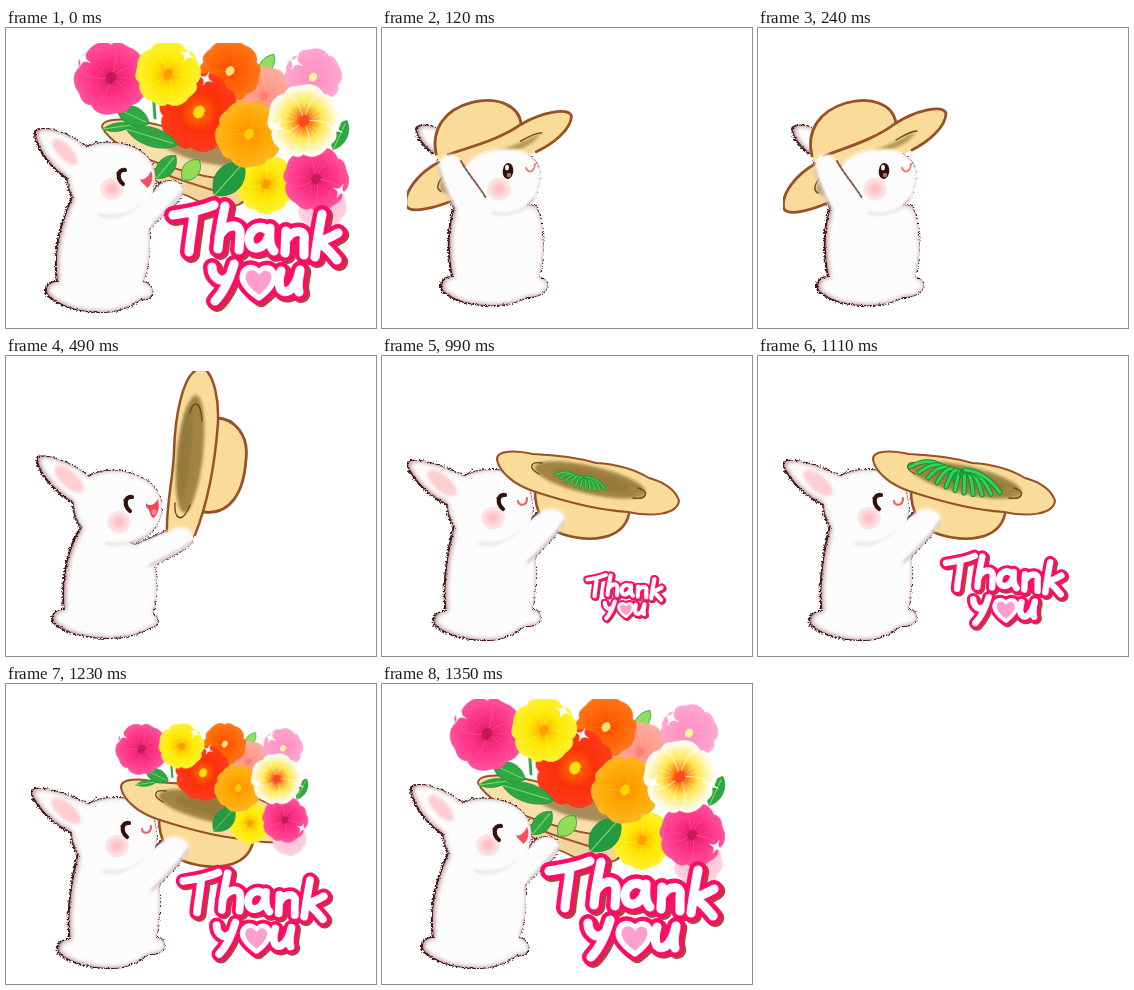
These frames come from a looping animation (370x300 px, 1.97 s). An HTML page:

```html
<!DOCTYPE html>
<html lang="en">
<head>
<meta charset="utf-8">
<title>Thank you</title>
<style>
html, body { margin: 0; width: 100%; height: 100%; overflow: hidden; background: #fff; }
svg { display: block; width: 100vw; height: 100vh; }
.pose { visibility: hidden; clip-path: url(#frame); }
.pose.on { visibility: visible; }
path { stroke-linecap: round; stroke-linejoin: round; }
</style>
</head>
<body>
<svg id="stage" viewBox="0 0 370 300" role="img" aria-label="Thank you">
  <defs>
    <clipPath id="frame"><rect x="25" y="15" width="320" height="270"/></clipPath>
    <filter id="fur" x="0" y="0" width="370" height="300" filterUnits="userSpaceOnUse" color-interpolation-filters="sRGB">
      <feTurbulence type="fractalNoise" baseFrequency=".6" numOctaves="1" seed="4" result="n"/>
      <feDisplacementMap in="SourceGraphic" in2="n" scale="3" xChannelSelector="R" yChannelSelector="G" result="d"/>
      <feMorphology in="SourceAlpha" operator="dilate" radius=".5" result="m"/>
      <feDisplacementMap in="m" in2="n" scale="6" xChannelSelector="G" yChannelSelector="R" result="e"/>
      <feOffset in="e" dx="-.6" dy=".2" result="e2"/>
      <feFlood flood-color="#48151a"/>
      <feComposite in2="e2" operator="in" result="edge"/>
      <feComponentTransfer in="d" result="inv"><feFuncA type="table" tableValues="1 0"/></feComponentTransfer>
      <feGaussianBlur in="inv" stdDeviation="2.4"/>
      <feOffset dx=".8" result="b"/>
      <feFlood flood-color="#a87a7c"/>
      <feComposite in2="b" operator="in"/>
      <feComposite in2="d" operator="in" result="shade"/>
      <feMerge><feMergeNode in="edge"/><feMergeNode in="d"/><feMergeNode in="shade"/></feMerge>
    </filter>
    <filter id="soft" x="-40%" y="-40%" width="180%" height="180%"><feGaussianBlur stdDeviation="1.6"/></filter>
    <radialGradient id="blush"><stop offset=".25" stop-color="#ffc0c3"/><stop offset="1" stop-color="#ffd0d2" stop-opacity=".4"/></radialGradient>
  </defs>
</svg>
<script>
const stage = document.getElementById('stage');
const line = (d, color, w, extra = '') => `<path d="${d}" fill="none" stroke="${color}" stroke-width="${w}" ${extra}/>`;
const area = (d, color, extra = '') => `<path d="${d}" fill="${color}" ${extra}/>`;
const oval = (x, y, rx, ry, turn, color, extra = '') =>
  `<ellipse rx="${rx}" ry="${ry}" transform="translate(${x} ${y}) rotate(${turn})" fill="${color}" ${extra}/>`;
const group = (move, body) => `<g transform="${move}">${body}</g>`;
const SOFT = 'filter="url(#soft)"';

const TAN = '#fadc9a', RIM = '#985026', SHADE = '#a18443', EYE = '#35100e', COAT = '#fdfcfc';

// Rabbit; a worn hat lies between the coat and the face
function rabbit(p, hat = '') {
  const [cx, cy] = p.cheek;
  const coat = [p.ear, p.body, p.head, p.arm].map(d => area(d, COAT)).join('');
  return `<g filter="url(#fur)">${coat}</g>` + hat +
    area(p.head, COAT, `${SOFT} opacity="${hat ? 1 : .5}"`) +
    (p.inner ? oval(...p.inner, '#ffced0', SOFT) : '') +
    line(p.chin, '#eadede', 2.5, SOFT) +
    oval(cx, cy, 12, 11.5, 0, 'url(#blush)') + p.face;
}
const winkEye = (x, y) => line(`M${x + 3} ${y - 7}C${x - 5} ${y - 8} ${x - 5} ${y + 2} ${x + 1} ${y + 7}`, EYE, 4.2) +
  line(`M${x - 2} ${y - 3}L${x - 5} ${y - 4}`, EYE, 1.5);
const armOver = (d, edge) => area(d, COAT, SOFT) + line(edge, '#c9b4b4', 2, SOFT);

const tipArm = 'M80 189C68 174 60 154 57 139C56 128 70 121 77 131C84 144 97 158 105 171Z';
const tipBody = {
  ear: 'M35 101C39 95 51 97 60 103L66 122L52 125C43 118 36 109 35 101Z',
  head: 'M78 150C80 134 98 121 124 121C148 120 160 136 158 153C154 176 136 186 116 187C91 187 77 170 78 150Z',
  body: 'M77 171C66 192 66 222 71 249C62 249 56 258 63 264C72 271 84 276 105 277C125 278 138 273 145 269C157 269 168 263 165 255C163 250 158 250 157 249C164 228 163 194 154 178Z',
  arm: tipArm, chin: 'M110 185C130 189 146 181 154 169', cheek: [117, 161],
  face: oval(126, 143, 5.3, 8, 4, EYE) + oval(125, 139.5, 2, 2.7, 0, '#fff') + oval(127, 147, 2.2, 2.3, 0, '#a5756c') +
    line('M144 140C146 145 152 145 153 136', '#f57e6b', 2)
};
const wornHat =
  area('M26 181C22 166 39 146 57 136L138 95C157 83 184 76 188 85C189 99 169 115 148 125C120 128 94 145 76 172C60 180 31 189 26 181Z', TAN) +
  area('M60 155C83 130 118 126 158 103C150 119 130 122 112 128C92 133 82 142 70 166C61 169 57 162 60 155Z', SHADE, `${SOFT} opacity=".8"`) +
  area('M54 129C48 103 61 83 88 75C113 68 135 76 138 95C116 113 82 124 57 136Z', TAN) +
  line('M54 128C48 103 61 83 88 75C113 68 135 76 138 95C116 112 86 120 66 128', RIM, 2.8) +
  line('M57 136C39 146 22 166 26 181C31 189 56 181 72 174M138 95C157 83 184 76 188 85C188 99 170 114 154 122', RIM, 2.8) +
  line('M138 112C146 107 154 103 159 103M66 147C57 153 54 162 60 165', '#70451f', 1.4);
const tipFront = armOver(tipArm, 'M57 140C61 158 68 172 74 181') +
  line('M79 133C86 146 97 158 104 170', '#6b3a31', 2, 'stroke-dasharray="3 1.5" opacity=".8"');

const reachArm = 'M128 190C143 183 157 177 172 171C181 170 189 176 187 184C184 193 165 199 142 213Z';
const lifter = rabbit({
  ear: 'M32 102C37 97 66 106 83 121L69 147C49 135 32 115 32 102Z',
  inner: [63, 123, 18, 8, 42],
  head: 'M68 149C67 126 88 113 112 115C137 117 157 133 156 153C154 176 134 188 110 188C87 188 70 172 68 149Z',
  body: 'M76 172C62 192 56 226 59 254C49 253 43 262 51 268C61 276 76 281 102 282C121 282 135 277 143 272C153 271 155 262 147 258C153 238 151 213 146 194Z',
  arm: reachArm, chin: 'M100 187C117 191 135 185 143 178', cheek: [113, 166],
  face: winkEye(123, 148) + area('M140 147C143 151 149 149 152 143C154 151 152 160 147 162C143 159 145 154 140 151Z', '#f44855') + oval(148, 156, 2.5, 3, 0, '#ff8793')
});
const liftedHat =
  area('M207 62C227 60 242 79 240 103C238 137 224 159 197 156Z', TAN) +
  line('M210 62C229 62 243 80 240 103C238 137 224 159 198 156', RIM, 2.8) +
  area('M190 14L200 14C208 22 213 43 212 66C209 110 202 146 189 179L161 178C160 149 167 124 168 96C169 58 177 22 190 14Z', TAN) +
  oval(184, 98, 13, 59, 6, SHADE, SOFT) + oval(179, 95, 6, 47, 5, '#7d6932', `${SOFT} opacity=".35"`) +
  line('M200 14C208 22 213 43 212 66C209 110 202 146 189 179M161 176C160 149 167 124 168 96C169 58 177 22 190 14', RIM, 2.5) +
  line('M184 57C187 43 195 45 196 65M169 147C168 163 176 169 184 149', '#70451f', 1.4);

const holdArm = 'M117 189C137 179 145 168 157 157C164 150 181 151 183 163C181 174 164 188 144 210Z';
const holder = rabbit({
  ear: 'M26 107C31 100 64 110 84 121L68 149C47 140 28 119 26 107Z',
  inner: [60, 127, 18, 8, 40],
  head: 'M66 148C66 125 88 113 111 114C136 115 151 130 151 150C151 174 134 186 109 187C84 188 67 171 66 148Z',
  body: 'M73 170C67 194 61 228 65 256C53 255 49 265 56 271C66 277 79 283 104 284C124 284 134 276 143 270C156 271 162 263 157 257C156 254 152 253 150 254C156 233 155 205 151 185Z',
  arm: holdArm, chin: 'M97 187C114 191 130 184 140 175', cheek: [111, 162],
  face: winkEye(120, 146) + line('M136 145C136 150 145 151 145 142', '#f4605d', 2.2)
});
const brim = 'M115 104C114 94 133 94 151 98C175 99 197 102 214 107C232 108 252 113 267 122C282 126 294 134 297 145C295 159 269 161 246 156C213 154 178 144 151 135C133 129 118 117 115 104Z';
const heldHat =
  area('M153 134C153 154 161 172 180 178C208 187 241 184 248 156Z', TAN) +
  line('M153 135C153 154 161 172 180 178C208 187 241 184 247 158', RIM, 2.6) +
  area(brim, TAN) +
  oval(208, 124, 57, 14, 13, SHADE, SOFT) + oval(209, 124, 40, 8, 13, '#7f6930', `${SOFT} opacity=".35"`) +
  line(brim, RIM, 2) +
  line('M160 107C148 105 146 112 157 118M256 132C268 135 265 144 251 142', '#70451f', 1.4);
const holdFront = armOver(holdArm, 'M182 165C176 177 160 192 146 206');

// Stems fan out from the middle of the hat
const grass = Array.from({ length: 11 }, (_, i) => {
  const x = 152 + i * 9, y = 111 + 28 * Math.sin(i * .2);
  const d = `M${197 + i} ${124 - i}Q${178 + i * 5} ${96 + i * 2} ${x} ${y.toFixed(1)}`;
  return line(d, '#168c38', 5) + line(d, '#31d455', 3);
}).join('');

// Flowers
let tint = 0;
function flower(x, y, r, inner, mid, outer, core, turn = 0) {
  const k = v => (v * r).toFixed(1), id = 'tint' + tint++;
  const petal = `M0 0C${k(-.28)} ${k(-.15)} ${k(-.68)} ${k(-.5)} ${k(-.5)} ${k(-.83)}C${k(-.38)} ${k(-1.02)} ${k(-.15)} ${k(-.93)} 0 ${k(-1)}C${k(.2)} ${k(-1.03)} ${k(.4)} ${k(-.98)} ${k(.52)} ${k(-.8)}C${k(.66)} ${k(-.5)} ${k(.28)} ${k(-.15)} 0 0Z`;
  const stops = [inner, mid, outer].map((c, i) => `<stop offset="${[.1, .5, .95][i]}" stop-color="${c}"/>`).join('');
  let out = `<radialGradient id="${id}" gradientUnits="userSpaceOnUse" cx="0" cy="0" r="${r}">${stops}</radialGradient>`;
  for (let i = 0; i < 5; i++) {
    out += group(`rotate(${turn + i * 72})`, area(petal, `url(#${id})`, `stroke="${outer}" stroke-width=".8"`) +
      line(`M0 ${k(-.25)}L0 ${k(-.75)}M${k(-.08)} ${k(-.25)}L${k(-.26)} ${k(-.66)}M${k(.08)} ${k(-.25)}L${k(.26)} ${k(-.66)}`, outer, .9, 'opacity=".4"'));
  }
  return group(`translate(${x} ${y})`, out + oval(0, 0, r * .14, r * .17, 30, core));
}
const leaf = (x, y, l, w, turn, color = '#2da843') => group(`translate(${x} ${y}) rotate(${turn})`,
  area(`M${-l} 0C${-l / 2} ${-w * 1.4} ${l / 2} ${-w * 1.4} ${l} 0C${l / 2} ${w * 1.4} ${-l / 2} ${w * 1.4} ${-l} 0Z`, color, 'stroke="#248d38" stroke-width=".7"') +
  line(`M${-l} 0L${l * .8} 0`, '#8bdc67', 1));
const spark = (x, y, r) => area(`M${x} ${y - r}Q${x} ${y} ${x + r} ${y}Q${x} ${y} ${x} ${y + r}Q${x} ${y} ${x - r} ${y}Q${x} ${y} ${x} ${y - r}Z`, '#fff', `stroke="#fff" stroke-width=".6" transform="rotate(25 ${x} ${y})"`);

const bouquet =
  flower(316, 178, 24, '#ffb5cc', '#ffc4d8', '#ffd0df', '#ffb5cc', 15) +
  leaf(260, 38, 14, 6, -55, '#8fe05c') + leaf(322, 82, 12, 6, 35) + leaf(334, 107, 16, 7, -65) +
  leaf(127, 88, 18, 9, 25) + leaf(112, 99, 15, 4, -8) + line('M147 62L149 90', '#36a83f', 3) + leaf(188, 73, 11, 5, 60) +
  flower(258, 68, 29, '#ff8f80', '#ff9f8e', '#ffab9b', '#ff8070', 20) +
  flower(307, 49, 28, '#ff8fbe', '#ff97c6', '#ffa6d0', '#fff3a0', 0) +
  flower(224, 43, 30, '#ff4d00', '#ff6200', '#ff7417', '#ffdf7a', 36) +
  flower(105, 50, 36, '#e3206a', '#ff2f82', '#ff4f9b', '#c21a52', 36) +
  flower(193, 84, 39, '#ff6a00', '#fb3009', '#ff3a1a', '#ffdf10', 12) +
  flower(162, 46, 32, '#ffb400', '#ffe800', '#fff02e', '#ff9d00', 0) +
  flower(260, 156, 29, '#ffb400', '#ffe800', '#fff02e', '#ff9d00', 24) +
  leaf(223, 151, 22, 13, -48, '#249b42') +
  flower(310, 151, 32, '#e3206a', '#ff2f82', '#ff4f9b', '#c21a52', 10) +
  flower(243, 106, 33, '#ff9000', '#ffa600', '#ffb31c', '#ffd000', 36) +
  flower(298, 93, 36, '#ff5a00', '#ffe64a', '#fffdf0', '#ff4a20', 0) +
  spark(77, 31, 8) + spark(181, 27, 8) + spark(200, 51, 7) + spark(289, 34, 8) + spark(271, 99, 8) + spark(329, 101, 8) + spark(334, 163, 7);

const fullHat =
  area('M118 116C127 139 151 158 182 168C207 182 233 184 242 168L235 120Z', '#f3d49c', 'stroke="#985026" stroke-width="1.8"') +
  line('M125 127C148 145 180 154 210 163', '#a15a2c', 2) +
  area('M96 99C96 88 128 90 160 99L245 122L242 154C194 151 111 129 96 99Z', '#f9dfab', 'stroke="#985026" stroke-width="1.8"') +
  oval(193, 121, 45, 12, 16, '#a78b58', SOFT);

const giveArm = 'M112 194C131 181 142 171 151 160C157 150 177 151 177 162C176 173 163 181 144 200Z';
const giver = rabbit({
  ear: 'M30 104C33 97 62 102 81 120L64 151C46 141 30 118 30 104Z',
  inner: [59, 124, 17, 7, 46],
  head: 'M62 150C60 128 82 113 105 115C131 116 150 129 149 151C149 174 130 187 106 187C81 188 63 173 62 150Z',
  body: 'M67 170C55 196 48 224 52 254C42 253 37 263 45 269C56 277 68 283 95 284C116 284 128 276 135 271C147 273 150 262 143 257C142 254 138 255 137 254C145 237 146 207 141 187Z',
  arm: giveArm, chin: 'M93 187C109 191 126 186 136 177', cheek: [106, 161],
  face: winkEye(116, 149) + area('M134 151C139 153 143 147 145 143C148 149 146 157 141 160C139 156 136 156 134 151Z', '#f2525c')
});
const giveFront = armOver(giveArm, 'M176 164C169 174 158 184 148 195') +
  leaf(146, 109, 27, 9, 17, '#30a642') + leaf(160, 139, 15, 8, -50) + leaf(185, 142, 13, 8, -50, '#94dd55');

// Lettering
const strokes = 'M167 187C181 185 197 182 208 177M188 184C187 198 184 211 183 224M219 178C216 192 213 208 212 221M213 209C219 196 235 193 234 207L233 222M262 203C253 194 243 203 243 212C244 224 258 222 262 210M264 200C263 210 264 219 268 223M280 203L279 225M280 212C287 200 301 201 298 213L298 227M316 186C313 201 311 215 309 229M332 205C325 209 319 212 312 214C321 219 326 226 331 232' +
  'M206 239C206 249 215 256 221 250M228 236C224 250 218 264 209 273M275 243C271 257 274 266 282 263C289 260 292 251 294 242M294 243C292 252 291 258 293 264';
const heart = 'M253 269C239 259 234 250 239 243C244 238 250 241 253 246C257 239 264 239 267 245C270 253 262 262 253 269Z';
const pile = (color, w) => line(strokes, color, w) + area(heart, color, `stroke="${color}" stroke-width="${w - 2}"`);
const words = size => group(`translate(${71 * (1 - size) / .3} ${76 * (1 - size) / .3}) scale(${size})`,
  group('translate(2.2 2)', pile('#a8483a', 18)) + pile('#ff0c66', 18) + pile('#fff', 9.2) +
  area(heart, '#ff9fd0', 'transform="translate(38 38) scale(.85)"'));

const held = holder + heldHat;
const tip = turn => rabbit(tipBody, group(`rotate(${turn} 105 130)`, wornHat)) + tipFront;
const given = fullHat + bouquet + giver + giveFront + words(1);
const poses = [
  [0, given],
  [120, tip(2)],
  [240, tip(0)],
  [490, lifter + liftedHat + armOver(reachArm, 'M186 186C175 195 157 202 143 210')],
  [740, held + holdFront],
  [990, held + group('translate(90 58) scale(.55)', grass) + holdFront + words(.45)],
  [1110, held + grass + holdFront + words(.7)],
  [1230, held + group('translate(62 30) scale(.7)', bouquet) + holdFront + words(.85)],
  [1350, given]
];
const LOOP = 1970;
stage.insertAdjacentHTML('beforeend', poses.map(p => `<g class="pose">${p[1]}</g>`).join(''));
const layers = [...stage.querySelectorAll('.pose')];

let start = null;
function draw(now) {
  if (start === null) start = now;
  const t = (now - start) % LOOP;
  const at = poses.filter(p => p[0] <= t).length - 1;
  layers.forEach((el, i) => el.classList.toggle('on', i === at));
  requestAnimationFrame(draw);
}
layers[0].classList.add('on');
requestAnimationFrame(draw);
</script>
</body>
</html>
```
